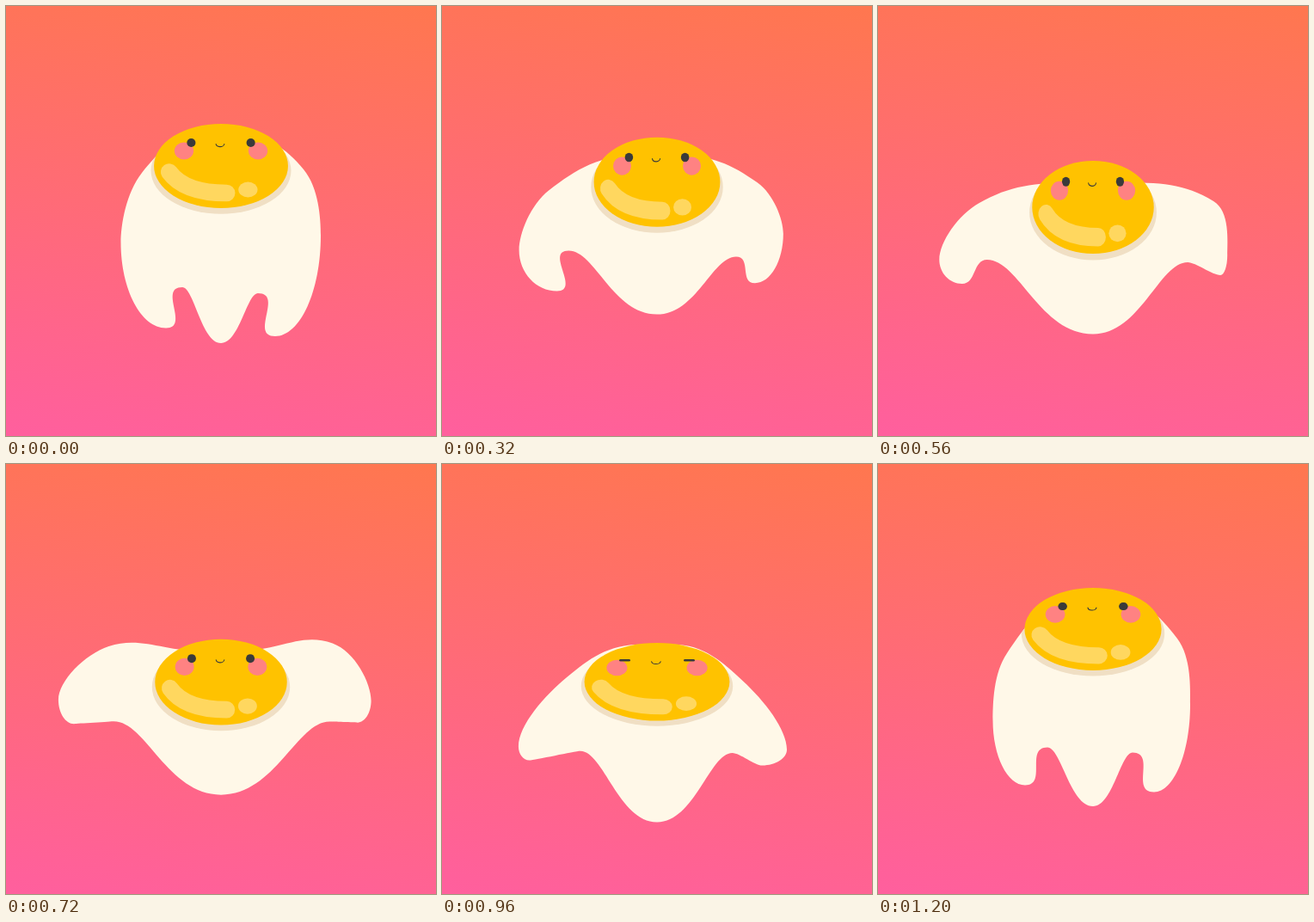
An HTML page with a canvas for the animation above (1.28 s loop, 500 by 500 pixels).

```html
<!DOCTYPE html>
<html lang="en">
<head>
<meta charset="utf-8">
<title>Floating egg</title>
<style>
html, body { margin: 0; width: 100%; height: 100%; overflow: hidden; }
body { background: linear-gradient(188deg, #ff774f, #ff5f9e); }
canvas { display: block; width: 100vw; height: 100vh; }
</style>
</head>
<body>
<canvas id="stage" width="500" height="500"></canvas>
<script>
const ctx = document.getElementById('stage').getContext('2d');
const LOOP = 1280, STEP = 80, MID = 250;
const poses = [];

// body: yolk centre, yolk half height, bottom of the middle lobe
// left, right: x, y of shoulder, outermost point, tip and notch
function pose(time, body, left, right) {
  poses.push({ time, values: [...body, ...left, ...right] });
}

pose(0, [186, 49, 392], [158, 194, 133.5, 275, 186, 374.5, 205, 327], [346, 190, 366, 267, 313, 384, 293, 334]);
pose(160, [191, 50, 361], [137, 214, 114.5, 272, 185, 345, 186, 303], [358, 196, 382.5, 262, 314, 353, 313, 313]);
pose(400, [213, 53, 362], [120, 215, 79, 290, 110, 327, 131, 280], [372, 211, 402.5, 269, 387, 311, 354, 285]);
pose(560, [234, 54, 381.5], [118, 229, 71.5, 295, 98, 323, 127, 295], [390, 227, 406, 290, 398, 313, 360, 298]);
pose(880, [264.5, 45.5, 392], [140, 206, 80, 271, 90, 298, 146, 309], [350, 203, 414.5, 275, 390, 304, 365, 308]);
pose(1040, [233, 46, 437], [150, 286, 102, 382, 121, 394.5, 178, 356], [353, 296, 383, 382, 350, 399.5, 306, 362]);
pose(1200, [192, 48, 398], [150, 220, 133.5, 298, 171, 373.5, 197, 329.5], [348, 203, 363, 280, 321, 381.5, 296, 335.5]);

// A bell curve around one moment
const bell = (t, at, width) => Math.exp(-(((t - at) / width) ** 2));

function poseAt(n) {
  const count = poses.length, turn = Math.floor(n / count);
  const { time, values } = poses[n - turn * count];
  return { time: time + turn * LOOP, values };
}

// Smooth cyclic interpolation through the poses
function blend(t) {
  let n = poses.length - 1;
  while (poses[n].time > t) n--;
  const [a, b, c, d] = [-1, 0, 1, 2].map(k => poseAt(n + k));
  const span = c.time - b.time, u = (t - b.time) / span;
  return b.values.map((p, i) => {
    const q = c.values[i];
    const m = (q - a.values[i]) / (c.time - a.time) * span;
    const k = (d.values[i] - p) / (d.time - b.time) * span;
    return p + (q - p) * u * u * (3 - 2 * u) + m * u * (1 - u) ** 2 - k * u * u * (1 - u);
  });
}

// One half of the egg white, from under the yolk down to the middle lobe
function addHalf(path, neck, lobe, [sx, sy, ox, oy, tx, ty, nx, ny]) {
  const side = Math.sign(MID - ox), hx = MID - side * 18;
  const slope = Math.hypot(ox - hx, oy - neck);
  const ux = (ox - hx) / slope, uy = (oy - neck) / slope;
  const above = Math.hypot(sx - hx, sy - neck) * 0.35;
  const below = Math.hypot(ox - sx, oy - sy);
  const curl = side * 0.6 * Math.abs(ty - ny);
  path.moveTo(MID, neck);
  path.lineTo(hx, neck);
  path.bezierCurveTo(hx + (sx - hx) * 0.45, neck, sx - ux * above, sy - uy * above, sx, sy);
  path.bezierCurveTo(sx + ux * below * 0.35, sy + uy * below * 0.35, ox, oy - below * 0.25, ox, oy);
  path.bezierCurveTo(ox, oy + (ty - oy) * 0.55, tx + (ox - tx) * 0.55, ty, tx, ty);
  path.bezierCurveTo(tx + curl, ty, nx - curl, ny, nx, ny);
  path.bezierCurveTo(nx + (MID - nx) * 0.3, ny, (MID + nx) / 2, lobe, MID, lobe);
  path.closePath();
}

function oval(x, y, rx, ry, color) {
  ctx.fillStyle = color;
  ctx.beginPath();
  ctx.ellipse(x, y, rx, ry, 0, 0, 7);
  ctx.fill();
}

function drawFace(t) {
  ctx.lineCap = 'round';
  ctx.strokeStyle = '#ffd75f';
  ctx.lineWidth = 19.5;
  ctx.beginPath();
  ctx.moveTo(-59.5, 7);
  ctx.quadraticCurveTo(-42, 31.5, 6.5, 31.5);
  ctx.stroke();
  oval(31, 27.5, 11, 9, '#ffd75f');

  const h = 10 - 8.5 * bell(t, 1010, 125), w = 12.5 - h / 4;
  for (const side of [-1, 1]) {
    oval(side * 42.5, -17.5, 11, 10, '#ff8282');
    ctx.fillStyle = '#3a3a3a';
    ctx.beginPath();
    ctx.roundRect(side * 34.2 - w / 2, -27 - h / 2, w, h, h / 2);
    ctx.fill();
  }

  ctx.strokeStyle = '#3a3a3a';
  ctx.lineWidth = 1.1;
  ctx.beginPath();
  ctx.ellipse(-1, -25.8, 4.8, 3.4, 0, 0.1, Math.PI - 0.1);
  ctx.stroke();
}

function draw(t) {
  const [y, ry, lobe, ...rim] = blend(t);
  const spread = 1 + 0.07 * bell(t, 720, 80);
  const points = rim.map((v, i) => i % 2 ? v : MID + (v - MID) * spread);
  const neck = y - ry + 1 + 2.7 * (ry - 45);
  const white = new Path2D();
  addHalf(white, neck, lobe, points.slice(0, 8));
  addHalf(white, neck, lobe, points.slice(8));

  // The yolk keeps its area as it squashes
  const toYolk = () => {
    ctx.translate(MID, y);
    ctx.scale(3820 / ry / 77, ry / 49);
  };
  ctx.clearRect(0, 0, 500, 500);
  ctx.fillStyle = '#fff8e8';
  ctx.fill(white);

  ctx.save();
  ctx.clip(white);
  toYolk();
  oval(0, 5.5, 80.5, 50.2, '#f0dfc4');
  ctx.restore();

  ctx.save();
  toYolk();
  oval(0, 0, 77, 49, '#ffc200');
  drawFace(t);
  ctx.restore();
}

function frame() {
  draw(Math.floor(performance.now() % LOOP / STEP) * STEP);
  requestAnimationFrame(frame);
}
frame();
</script>
</body>
</html>
```
